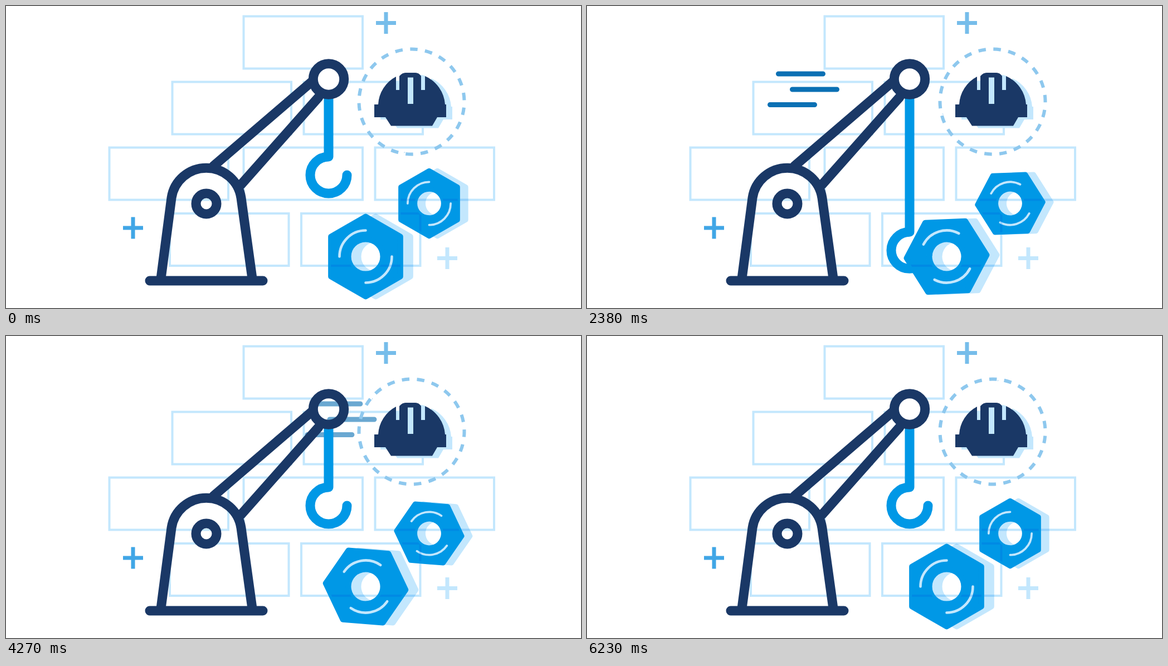
An HTML page that plays this animation: 1032 px wide and 543 px high, repeating every 6300 ms.

```html
<!DOCTYPE html>
<html lang="en">
<head>
<meta charset="utf-8">
<title>Crane</title>
<style>
  html, body { margin: 0; width: 100%; height: 100%; overflow: hidden; background: #fff; }
  svg { display: block; width: 100%; height: 100%; }
  .line { fill: none; stroke-linecap: round; stroke-linejoin: round; }
  .navy { stroke: #1a3866; stroke-width: 17; }
  .hex { fill-rule: evenodd; stroke-width: 10; stroke-linejoin: round; }
  .pale { fill: #c3e7fd; stroke: #c3e7fd; mix-blend-mode: multiply; }
  .blue { fill: #0098e6; stroke: #0098e6; }
</style>
</head>
<body>
<svg viewBox="0 0 1032 543">
  <defs>
    <path id="hex" d="M0-72L62.35-36V36L0 72L-62.35 36V-36ZM31 0A31 31 0 1 0-31 0A31 31 0 1 0 31 0Z"/>
    <path id="plus" d="M-18 0H18M0-19.5V19.5" stroke-width="7"/>
    <path id="helmet" fill-rule="evenodd" d="M661 177H668A60 60 0 0 1 700 127V151H706V126Q711 120 717 120H735Q741 120 745 126V151H752V126A60 60 0 0 1 788 177H790V200H774L765 215.5H691L681 200H661ZM721 128.500H731V176H721Z"/>
    <clipPath id="nutArea">
      <g></g>
      <use class="bigClip" href="#hex" clip-rule="evenodd"/>
      <use class="smallClip" href="#hex" clip-rule="evenodd"/>
    </clipPath>
    <g id="nut">
      <g transform="translate(18)"><use class="hex pale spin" href="#hex"/></g>
      <g class="spin">
        <use class="hex blue" href="#hex"/>
        <path class="line" d="M-47 0A47 47 0 0 1 0-47M47 0A47 47 0 0 1 0 47" stroke="#c3e7fd" stroke-width="4.600"/>
      </g>
    </g>
  </defs>

  <g id="bricks" fill="none" stroke="#c3e7fd" stroke-width="4"></g>

  <use href="#plus" x="682" y="30.500" stroke="#76bdea"/>
  <use href="#plus" x="228" y="399" stroke="#40a6e6"/>
  <use href="#plus" x="792" y="453.500" stroke="#c3e7fd"/>

  <circle cx="579" cy="131.500" r="20" fill="#fff"/>
  <path id="bars" class="line" d="M4.500 122H84.500M29.500 150H109.500M-10.500 177.500H69.500" stroke="#0b70b4" stroke-width="9"/>

  <circle id="ring" cx="728" cy="172" r="94.500" fill="none" stroke="#8ec8ee" stroke-width="6" pathLength="22" stroke-dasharray=".5 .5"/>
  <use href="#helmet" x="11" y="4" fill="#c3e7fd"/>
  <use href="#helmet" fill="#1a3866"/>

  <path id="hook" class="line" stroke="#0098e6" stroke-width="17"/>
  <g class="line navy">
    <path d="M372 288L550 135M422 321L561 164"/>
    <path d="M278 490L297 345A63.200 63.200 0 0 1 422 345L442 490M258 494H461"/>
    <circle cx="359.500" cy="355.500" r="18.500"/>
    <circle cx="579" cy="131.500" r="27.700"/>
  </g>

  <g id="nuts"></g>
  <use href="#bricks" clip-path="url(#nutArea)" style="mix-blend-mode:multiply"/>
</svg>
<script>
const $ = s => document.querySelector(s);
const big = 'translate(645.5 450.5)', small = 'translate(759.5 355) scale(.822)';

const rows = [[18.5, 426.5], [136.5, 298.5, 534.5], [254.5, 185.5, 426.5, 662.5], [373, 294, 530]];
$('#bricks').innerHTML = rows.map(([y, ...xs]) =>
  xs.map(x => `<rect x="${x}" y="${y}" width="213.5" height="94"/>`).join('')).join('');

const nut = $('#nut').innerHTML;
$('#nuts').innerHTML = [big, small].map(at => `<g transform="${at}">${nut}</g>`).join('');
$('#nut').remove();
$('#nutArea g').remove();
const spinners = document.querySelectorAll('.spin');

// Linear progress from a to b, clamped to 0..1
const part = (t, a, b) => Math.min(1, Math.max(0, (t - a) / (b - a)));

function draw(t) {
  const drop = 195 * part(t, 700, 2100) - 194 * part(t, 2100, 3010);
  $('#hook').setAttribute('d', `M579 160V${271 + drop}a33 33 0 1 0 33 33`);

  const turn = `rotate(${360 * part(t, 2100, 5740)})`;
  spinners.forEach(el => el.setAttribute('transform', turn));
  $('.bigClip').setAttribute('transform', `${big} ${turn}`);
  $('.smallClip').setAttribute('transform', `${small} ${turn}`);

  const x = 28 + 311 * part(t, 0, 1050) + 0.169 * Math.max(0, t - 3013);
  $('#bars').setAttribute('transform', `translate(${x})`);
  $('#bars').setAttribute('opacity', part(t, 0, 1050) - part(t, 3013, 6230));

  $('#ring').setAttribute('transform', `rotate(${6.5 + t / 35} 728 172)`);
}

const step = 70, loop = 6300;
let start;
function tick(now) {
  start ??= now;
  draw(Math.floor((now - start) % loop / step) * step);
  requestAnimationFrame(tick);
}
draw(0);
requestAnimationFrame(tick);
</script>
</body>
</html>
```
